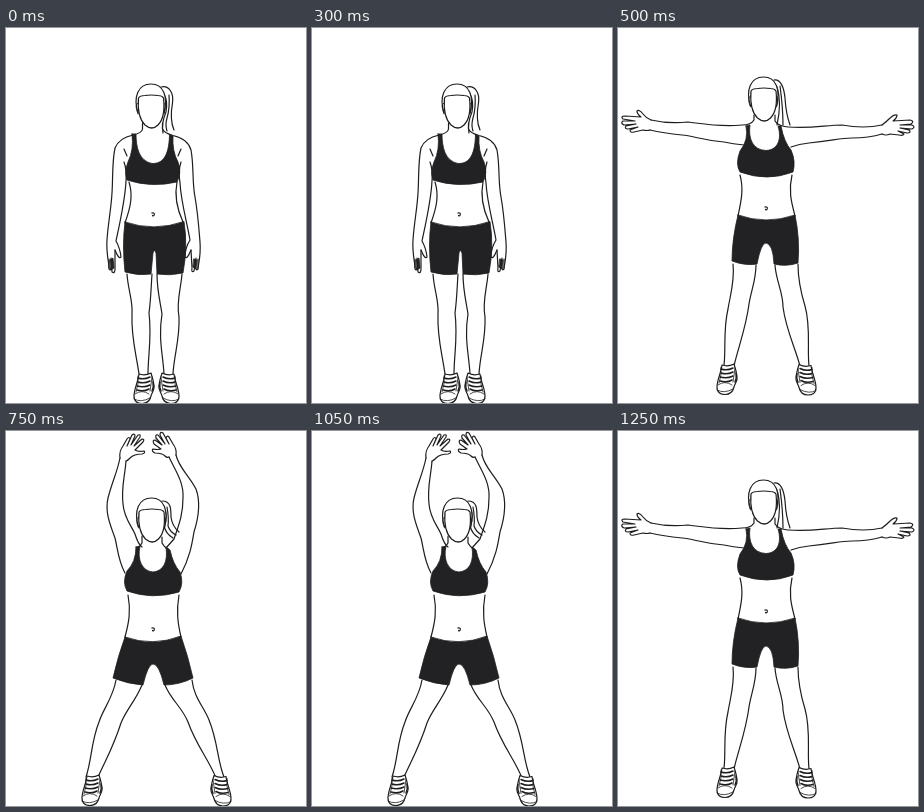
Recreate the animation shown at these times as an HTML page. Size 300 by 375 pixels, loop 1500 ms.

```html
<!DOCTYPE html>
<html lang="en">
<head>
<meta charset="utf-8">
<title>Jumping jack</title>
<style>
html, body { margin: 0; width: 100%; height: 100%; overflow: hidden; background: #fff; }
svg { display: block; width: 100vw; height: 100vh; }
path { fill: none; stroke: #1d1d1f; stroke-width: 1.2; stroke-linecap: round; stroke-linejoin: round; }
.skin { fill: #fff; }
.cloth { fill: #222224; stroke-width: .8; }
.lace { stroke-width: 1.5; }
.thin { stroke-width: .8; }
</style>
</head>
<body>
<svg id="stage" viewBox="0 0 300 375"></svg>
<script>
const path = (d, cls = '') => `<path class="${cls}" d="${d}"/>`;
const at = (x, y, body, flip = 1) => `<g transform="translate(${x} ${y}) scale(${flip} 1)">${body}</g>`;

// Origin: top of the hair
const head =
  path('M-13 29C-18 13-13 0 0 0S17 13 13 29Z', 'skin') +
  path('M-13 19Q-17 20-13 30M13 19Q16 21 13 30', 'thin') +
  path('M-12.5 14Q-11 11.5-6 11.5Q0 10.5 7 11.5Q11 11.5 12.5 14C14 28 12 36 7 41Q1 47-6 41C-12 35-13.5 26-12.5 14Z', 'skin');

// Origin: middle of the ankle
const shoe =
  path('M-5 0C-6 8-10 15-10 22C-10 28-6 29.5-2 29.5C4 29.5 6 26 7 22C8 18 11 16 10 11Q9 5 7-1Q1 2-5 0Z', 'skin') +
  path('M-6 4Q0 6 6 3M-6 8Q0 10 6 7M-7 12Q0 14 6 11M-7 16Q0 18 5 15', 'lace') +
  path('M-9 20Q-2 15 5 20M-10 25Q-3 29 6 24', 'thin') +
  path('M8 3Q7 11 6 17M-6 2Q-5 10-8 18', 'thin') +
  path('M9 8Q10 13 8 17', 'lace');

const navel = path('M-1.2-1.5Q2-2 1.2 .5Q.5 2-.5 1');

const figure = p =>
  p.lines.map(d => path(d)).join('') +
  p.cloth.map(d => path(d, 'cloth')).join('') +
  p.hair.map(d => path(d)).join('') +
  at(...p.head, head) + at(...p.navel, navel) +
  at(...p.shoes[0], shoe) + at(...p.shoes[1], shoe, -1);

const stand = {
  head: [145, 56], navel: [147, 186.5], shoes: [[138, 346], [163, 346]],
  hair: [
    'M155 59C163 57 168 65 166.5 75C164.5 86 165 95 168 102',
    'M158 66Q162 73 160 84Q155 96 157 105',
    'M163 67Q164 80 161 90Q159 97 161 103'
  ],
  lines: [
    // Neck and arms
    'M136.5 95V101Q136 105 127 107Q113 110 109 120C106 134 107 150 106 165C105 182 102 196 101 212C100 224 103 235 103 240',
    'M156.5 95V101Q158 105 167 107.5Q182 111 185 122C188 138 186 154 189 169C192 186 193 202 194 214C195 226 193 234 192 240',
    'M118 134Q121 142 120 153C119 173 114 194 110 213Q114 220 115 229Q113 232 109 222',
    'M175 134Q172 143 174 155C175 174 181 194 184 212Q179 220 179 229Q181 232 185 222',
    // Hands
    'M103 231L103 241M105 230L106 244Q109 246 109 241L109 222M103 241Q104 243 105 240',
    'M192 231V241Q190 243 190 240M190 230L188 243Q185 245 186 240L185 222',
    'M118 121L121 128M175 121L172 128',
    // Waist
    'M123 154C127 167 125 178 119 195M171 154C168 169 171 181 177 194',
    // Legs
    'M121 246C122 262 127 272 126 286C125 309 130 325 133 346',
    'M146 246C145 260 145 270 143 285C146 309 142 327 142 346',
    'M151 246C151 262 154 273 156 286C152 310 157 327 158 346',
    'M176 246C175 260 170 274 173 289C174 311 168 327 167 346'
  ],
  cloth: [
    'M126 106L130 106C130 119 133 133 146 135.5C159 136 163 124 163.5 107L167 108Q166 123 172 134Q176 145 171 154Q145 160 121 152Q118 144 122 134Q128 122 126 106Z',
    'M119 194Q148 204 178 193.5Q182 218 177 245Q164 248 151 246L150 225Q148 220 147 225L145 246Q132 248 119 244Q116 217 119 194Z',
    'M104 232L107 230L108 240L105 242Z', 'M188 231L191 232L190 241L187 239Z'
  ]
};

const wide = {
  head: [145.5, 49], navel: [148, 180.5], shoes: [[109, 337], [188, 337.5]],
  hair: [
    'M156 52C163 51 166 60 167 70Q168 86 172 97',
    'M159 59Q164 75 159 97',
    'M162 58Q165 80 165 97'
  ],
  lines: [
    'M136 87V92Q133 97 124 97C101 99 86 96 70 94Q50 96 33 92',
    'M157 87V93Q160 98 170 99C193 101 208 97 224 97Q246 101 264 97',
    'M126 117Q115 116 106 114C83 112 76 108 64 107Q45 105 32 102',
    'M173 119Q181 116 191 115C214 113 221 110 234 110Q251 110 264 106',
    // Hands
    'M33 92Q28 90 25 86Q21 81 19 83Q19 86 23 89L7 88Q2 88 5 91L17 93L5 93Q2 95 6 97L18 96L8 98Q6 101 10 101L20 99L12 102Q12 105 16 104L25 102Q29 103 32 102',
    'M264 97Q268 94 271 91Q276 86 279 87Q279 90 275 93L292 92Q297 93 293 96L282 97L294 97Q298 99 294 101L282 100L291 102Q294 105 289 105L280 103L286 106Q285 108 281 107L272 106Q268 108 264 106',
    'M122 147C126 161 123 174 120 188M174 147C170 164 174 176 177 188',
    // Legs
    'M115 236C117 253 112 268 110 281C105 302 108 321 106 337',
    'M138 237C138 252 133 263 131 276C128 300 120 320 116 338',
    'M157 237C158 253 165 264 165 279C168 302 177 319 182 338',
    'M180 236C180 253 183 265 187 278C193 299 189 320 191 338'
  ],
  cloth: [
    'M128 98L132 97C130 111 135 122 148 122.5C160 122 164 111 160 98L163 98Q166 114 173 122Q178 133 175 144Q149 154 122 144Q117 136 122 123Q131 112 128 98Z',
    'M120 187Q148 197 177 187Q182 211 180 235Q168 239 156 236Q155 216 148 215Q143 215 139 236Q127 238 114 233Q114 211 120 187Z'
  ]
};

const high = {
  head: [145.5, 67], navel: [147, 198.5], shoes: [[86, 345], [215, 345.5]],
  hair: [
    'M156 70C165 70 165 78 165 86Q166 95 173 101',
    'M159 79Q162 86 158 95Q160 103 167 107',
    'M161 76Q163 87 162 95Q164 101 170 104'
  ],
  lines: [
    // Arms, outer then inner
    'M119 142C112 129 112 119 109 107C103 91 99 80 102 67C106 51 111 42 114 27',
    'M175 143C184 126 186 113 188 101C194 82 194 69 190 58C182 43 173 37 170 24',
    'M120 30C119 45 115 56 117 73C118 87 125 94 129 103Q132 113 136 116',
    'M163 26C169 39 178 51 177 67C177 85 172 96 168 108L160 117',
    // Hands
    'M114 27Q113 20 117 15L121 8Q123 5 124 8L121 15L126 4Q129 2 129 5L125 14L132 4Q135 3 134 6L128 15L136 8Q139 8 137 11L129 19Q132 21 138 20Q140 22 136 23Q128 23 124 27Q121 30 120 30',
    'M170 24Q171 18 167 13L163 6Q161 4 160 7L163 13L157 2Q154 0 154 4L159 13L152 4Q149 3 150 7L156 14L149 9Q146 9 148 13L155 18Q151 19 147 18Q145 20 149 22Q156 22 159 25Q161 27 163 26',
    'M136 105V112Q134 116 131 117M156 106V112Q158 116 162 118',
    'M122 164C125 180 123 191 119 206M173 164C170 181 172 193 175 206',
    // Legs
    'M110 249C107 267 97 278 93 291C85 311 86 328 80 346',
    'M136 254C130 269 120 279 115 292C107 317 100 328 92 346',
    'M159 254C165 269 176 276 182 291C190 314 203 329 210 347',
    'M186 249C188 267 198 276 203 289C212 311 211 328 218 346'
  ],
  cloth: [
    'M130 116L134 115C131 129 136 140 147 141C158 140 162 130 160 116L164 119Q167 133 174 141Q178 152 173 161Q146 169 121 160Q116 151 121 140Q130 131 130 116Z',
    'M119 206Q147 216 175 205Q182 225 187 247Q173 254 158 254Q153 233 147 233Q142 233 137 254Q122 253 107 247Q112 225 119 206Z'
  ]
};

const stage = document.getElementById('stage');
stage.innerHTML = [stand, wide, high].map(p => `<g>${figure(p)}</g>`).join('');
const poses = [...stage.children];

function draw(ms) {
  const t = ms % 1500;
  const index = t < 500 ? 0 : t < 750 || t >= 1250 ? 1 : 2;
  poses.forEach((g, i) => g.setAttribute('display', i === index ? 'inline' : 'none'));
}

const start = performance.now();
function tick() {
  draw(performance.now() - start);
  requestAnimationFrame(tick);
}
tick();
</script>
</body>
</html>
```
